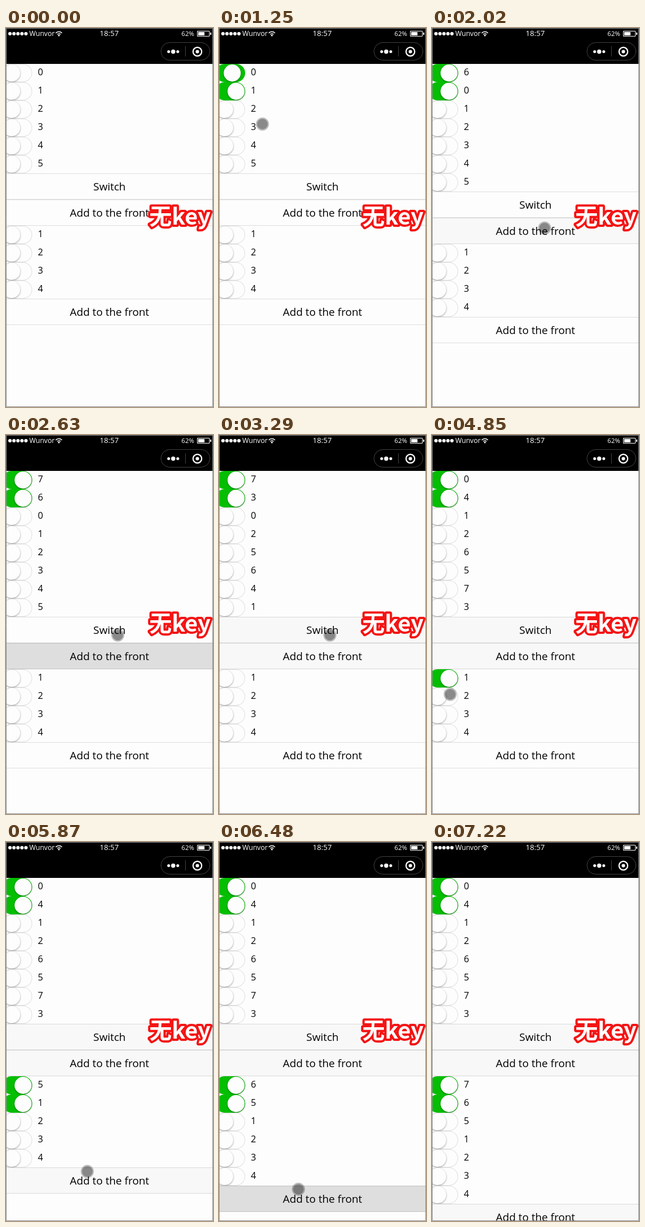
Recreate the animation shown at these times as an HTML page with a canvas. Size 364 by 665 pixels, loop 7810 ms.

```html
<!DOCTYPE html>
<html lang="zh">
<head>
<meta charset="utf-8">
<title>List without keys</title>
<style>
html, body { margin: 0; width: 100%; height: 100%; overflow: hidden; background: #fdfdfd; }
canvas { display: block; }
</style>
</head>
<body>
<canvas id="stage" width="364" height="665"></canvas>
<script>
const W = 364, H = 665, LOOP = 7810;
const TOP = 63, ROW = 32, BUTTON = 46;
const PAGE = '#fdfdfd', IDLE = '#f8f8f8', PRESSED = '#dedede';
const SANS = '"Open Sans", "Noto Sans", sans-serif';
const ctx = document.getElementById('stage').getContext('2d');

// Delays after a press: list update, highlight off, switch slide.
const UPDATE = 150, RELEASE = 250, SLIDE = 250;

// Tap times; toggles are given per row.
const upper = {
  first: 0, size: 6,
  toggles: [1085, 820],
  adds: [1610, 2400],
  shuffles: [2910, 3400, 3880],
  orders: ['73025641', '06351724', '04126573']
};
const lower = {
  first: 1, size: 4,
  toggles: [4590, 4900],
  adds: [5540, 6250, 6940],
  shuffles: [], orders: []
};

// Pointer way points: time, x, y
const HIDE = 7200;
const path = [
  [30, 268, 624], [400, 139, 190], [500, 99, 113], [770, 14, 92],
  [1085, 16, 88], [1250, 76, 168], [1560, 195, 334], [2020, 198, 351],
  [3700, 194, 351], [4080, 194, 351], [4350, 105, 413], [4590, 22, 432],
  [4850, 32, 455], [4980, 34, 458], [5360, 143, 556], [5870, 143, 578],
  [6790, 138, 625]
];

const clamp = v => Math.min(1, Math.max(0, v));

function pointerAt(t) {
  const i = path.findIndex(p => t < p[0]);
  if (i < 0) return path[path.length - 1].slice(1);
  const [t0, x0, y0] = path[i - 1], [t1, x1, y1] = path[i];
  const k = (t - t0) / (t1 - t0);
  return [x0 + (x1 - x0) * k, y0 + (y1 - y0) * k];
}

// New items take the next number and go in front.
function itemsAt(list, t) {
  const done = presses => presses.filter(p => t >= p + UPDATE).length;
  const shuffled = done(list.shuffles);
  if (shuffled) return [...list.orders[shuffled - 1]];
  const items = Array.from({ length: list.size }, (_, i) => list.first + i);
  for (let n = done(list.adds); n > 0; n--) items.unshift(list.first + items.length);
  return items;
}

function rect(x, y, w, h, fill) {
  ctx.fillStyle = fill;
  ctx.fillRect(x, y, w, h);
}

function disc(x, y, r, fill) {
  ctx.fillStyle = fill;
  ctx.beginPath();
  ctx.arc(x, y, r, 0, Math.PI * 2);
  ctx.fill();
}

function pill(x, y, w, h) {
  ctx.beginPath();
  ctx.roundRect(x, y, w, h, h / 2);
}

function label(text, x, y, size, fill, align = 'left', weight = 400) {
  ctx.font = `${weight} ${size}px ${SANS}`;
  ctx.textAlign = align;
  ctx.fillStyle = fill;
  ctx.fillText(text, x, y);
}

function drawSwitch(y, on) {
  pill(-6, y, 52, 32);
  ctx.fillStyle = on > 0 ? '#04be02' : '#dfdfdf';
  ctx.fill();
  const k = clamp(1 - on * 1.6);
  pill(20 - 25 * k, y + 16 - 15 * k, 50 * k, 30 * k);
  ctx.fillStyle = PAGE;
  ctx.fill();
  ctx.save();
  ctx.shadowColor = 'rgba(0,0,0,0.4)';
  ctx.shadowBlur = 3;
  ctx.shadowOffsetY = 1;
  disc(10 + 20 * on, y + 16, 15, PAGE);
  ctx.restore();
}

function drawList(list, y, t) {
  for (const [i, item] of itemsAt(list, t).entries()) {
    const tapped = list.toggles[i] ?? Infinity;
    drawSwitch(y, clamp((t - tapped) / SLIDE));
    label(item, 56, y + 20, 16, '#000');
    y += ROW;
  }
  return y;
}

function drawButton(text, y, presses, t) {
  const held = presses.some(p => t >= p && t < p + RELEASE);
  const fill = held ? PRESSED : t >= presses[0] ? IDLE : PAGE;
  rect(1, y, W - 2, BUTTON, fill);
  for (const line of [y, y + BUTTON - 1]) rect(1, line, W - 2, 1, 'rgba(0,0,0,0.12)');
  label(text, W / 2, y + 30, 18.8, '#000', 'center');
  return y + BUTTON;
}

function drawHeader() {
  rect(0, 0, W, TOP, '#000');
  for (let i = 0; i < 5; i++) disc(7 + i * 7, 10, 3, '#fff');
  label('Wunvor', 41, 14, 12.2, '#fff', 'left', 500);
  label('18:57', 181.5, 13.5, 13.2, '#fff', 'center', 500);
  label('62%', 331, 14, 11.4, '#fff', 'right', 500);

  ctx.strokeStyle = '#fff';
  ctx.lineWidth = 1.6;
  for (const r of [4, 7.5]) {
    ctx.beginPath();
    ctx.arc(93, 14, r, -Math.PI * 0.76, -Math.PI * 0.24);
    ctx.stroke();
  }
  disc(93, 13, 1.5, '#fff');

  ctx.lineWidth = 1;
  ctx.strokeRect(336.5, 5.5, 21, 9);
  rect(338, 7, 11, 6, '#fff');
  rect(359, 8, 2, 4, '#fff');

  pill(272.5, 25.5, 86, 31);
  ctx.strokeStyle = '#414141';
  ctx.stroke();
  for (const side of [-1, 0, 1]) disc(294 + side * 8, 41.5, side ? 2.5 : 3.7, '#fff');
  rect(315, 32, 1, 18, '#414141');
  disc(336.5, 41.5, 3, '#fff');
  ctx.beginPath();
  ctx.arc(336.5, 41.5, 7.6, 0, Math.PI * 2);
  ctx.strokeStyle = '#fff';
  ctx.lineWidth = 2.2;
  ctx.stroke();
}

function drawSticker() {
  ctx.font = 'bold 39.5px "Noto Sans CJK SC", "Noto Sans CJK", sans-serif';
  ctx.textAlign = 'left';
  ctx.lineJoin = 'round';
  ctx.lineWidth = 8;
  ctx.strokeStyle = '#f41414';
  ctx.strokeText('无key', 252, 344.5);
  ctx.fillStyle = '#fff';
  ctx.fillText('无key', 252, 344.5);
}

function drawPointer(t) {
  if (t < path[0][0] || t >= HIDE) return;
  const [x, y] = pointerAt(t);
  disc(x, y, 11.5, 'rgba(0,0,0,0.25)');
  disc(x, y, 9.3, 'rgba(0,0,0,0.27)');
}

function draw(t) {
  rect(0, 0, W, H, PAGE);
  let y = drawList(upper, TOP, t);
  y = drawButton('Switch', y, upper.shuffles, t);
  y = drawButton('Add to the front', y, upper.adds, t);
  y = drawList(lower, y, t);
  drawButton('Add to the front', y, lower.adds, t);
  drawPointer(t);
  drawHeader();
  drawSticker();
  ctx.strokeStyle = '#8c8c8c';
  ctx.lineWidth = 1;
  ctx.strokeRect(0.5, 0.5, W - 1, H - 1);
}

const start = performance.now();
function tick() {
  draw((performance.now() - start) % LOOP);
  requestAnimationFrame(tick);
}
tick();
</script>
</body>
</html>
```
